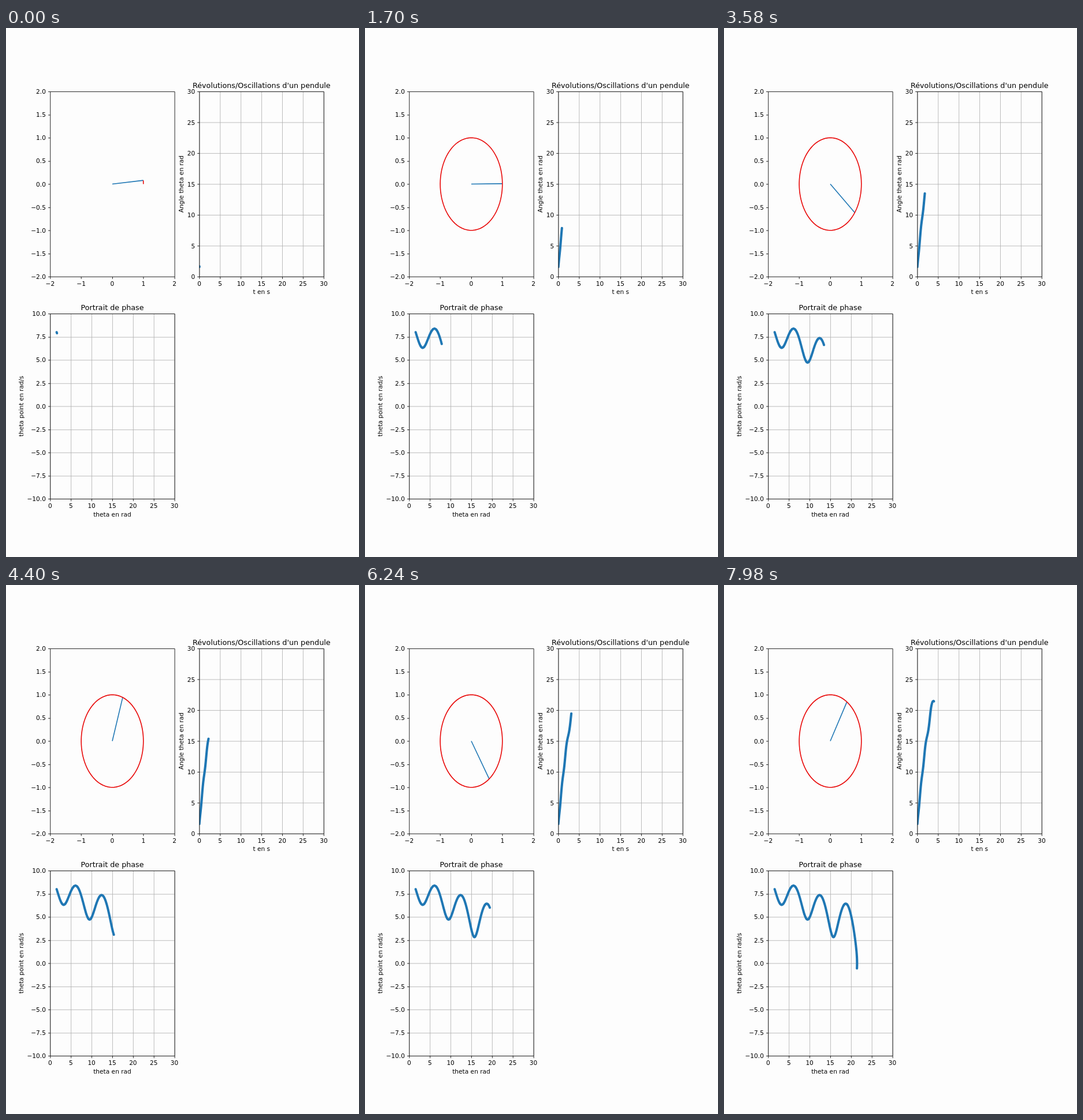
Recreate the animation shown at these times as an HTML page with a canvas. Size 611 px wide and 917 px high, loop 8000 ms.

```html
<!DOCTYPE html>
<html lang="fr">
<head>
<meta charset="utf-8">
<title>Pendule</title>
<style>
  html, body { margin: 0; width: 100%; height: 100%; overflow: hidden; background: #fdfdfd; }
  canvas { display: block; }
</style>
</head>
<body>
<canvas id="stage" width="611" height="917"></canvas>
<script>
const ctx = document.getElementById('stage').getContext('2d');

// The figure is laid out on an 800 x 1200 sheet at 100 dpi.
const W = 800, H = 1200, PT = 100 / 72;
const LOOP = 8000, STEP = 20, FRAMES = LOOP / STEP;
const BLUE = '#1f77b4', RED = '#e80808', GRID = '#b0b0b0';

const range = (from, to, step) =>
  Array.from({ length: Math.round((to - from) / step) + 1 }, (_, i) => from + i * step);
const snap = v => Math.floor(v + 0.5 + 1e-6) + 0.5;
const label = (v, digits) => v.toFixed(digits).replace('-', '\u2212');

// Damped pendulum, integrated with fourth-order Runge-Kutta.
function simulate(count, dt = 0.01, g = 9.81, damping = 0.2) {
  const slope = ([a, w]) => [w, -g * Math.sin(a) - damping * w];
  const move = (s, d, h) => [s[0] + d[0] * h, s[1] + d[1] * h];
  const states = [[Math.PI / 2, 8]];
  for (let i = 1; i < count; i++) {
    const s = states[i - 1];
    const k1 = slope(s);
    const k2 = slope(move(s, k1, dt / 2));
    const k3 = slope(move(s, k2, dt / 2));
    const k4 = slope(move(s, k3, dt));
    states.push(s.map((v, j) => v + dt / 6 * (k1[j] + 2 * k2[j] + 2 * k3[j] + k4[j])));
  }
  return states.map(([angle, speed], i) => ({
    t: i * dt, angle, speed, x: Math.sin(angle), y: -Math.cos(angle)
  }));
}

const states = simulate(FRAMES + 1);

const boxW = 0.775 * W / 2.2, boxH = 0.77 * H / 2.2;

function makeAxes(col, row, xs, ys, options) {
  const left = 0.125 * W + col * 1.2 * boxW;
  const top = 0.12 * H + row * 1.2 * boxH;
  const x0 = xs[0], x1 = xs[xs.length - 1];
  const y0 = ys[0], y1 = ys[ys.length - 1];
  return {
    left, top, right: left + boxW, bottom: top + boxH, xs, ys, ...options,
    px: v => left + (v - x0) / (x1 - x0) * boxW,
    py: v => top + (y1 - v) / (y1 - y0) * boxH
  };
}

const tens = range(0, 30, 5);
const swing = makeAxes(0, 0, range(-2, 2, 1), range(-2, 2, 0.5), { digits: 1 });
const history = makeAxes(1, 0, tens, tens, {
  digits: 0, grid: true, title: "Révolutions/Oscillations d'un pendule",
  xlabel: 't en s', ylabel: 'Angle theta en rad', ylabelX: 402
});
const phase = makeAxes(0, 1, tens, range(-10, 10, 2.5), {
  digits: 1, grid: true, title: 'Portrait de phase',
  xlabel: 'theta en rad', ylabel: 'theta point en rad/s', ylabelX: 38.9
});

function polyline(points, color, width) {
  ctx.beginPath();
  points.forEach(([x, y]) => ctx.lineTo(x, y));
  ctx.strokeStyle = color;
  ctx.lineWidth = width * PT;
  ctx.stroke();
}

function text(str, x, y, size = 10, align = 'center') {
  ctx.font = `${size * PT}px "DejaVu Sans", sans-serif`;
  ctx.textAlign = align;
  ctx.fillText(str, x, y);
}

function drawGrid(ax) {
  if (!ax.grid) return;
  ax.xs.forEach(v => {
    const x = snap(ax.px(v));
    polyline([[x, ax.top], [x, ax.bottom]], GRID, 0.8);
  });
  ax.ys.forEach(v => {
    const y = snap(ax.py(v));
    polyline([[ax.left, y], [ax.right, y]], GRID, 0.8);
  });
}

function drawFrame(ax) {
  const l = snap(ax.left), r = snap(ax.right), t = snap(ax.top), b = snap(ax.bottom);
  const tick = 3.5 * PT;
  ctx.strokeStyle = ctx.fillStyle = '#000';
  ctx.lineWidth = 0.8 * PT;
  ctx.strokeRect(l, t, r - l, b - t);

  ax.xs.forEach(v => {
    const x = snap(ax.px(v));
    polyline([[x, b], [x, b + tick]], '#000', 0.8);
    text(label(v, 0), ax.px(v), ax.bottom + 20.3);
  });
  ax.ys.forEach(v => {
    const y = snap(ax.py(v));
    polyline([[l - tick, y], [l, y]], '#000', 0.8);
    text(label(v, ax.digits), ax.left - 2 * tick, ax.py(v) + 5.3, 10, 'right');
  });

  const midX = (ax.left + ax.right) / 2, midY = (ax.top + ax.bottom) / 2;
  if (ax.title) text(ax.title, midX, ax.top - 6 * PT, 12);
  if (ax.xlabel) text(ax.xlabel, midX, ax.bottom + 39.8);
  if (ax.ylabel) {
    ctx.save();
    ctx.translate(ax.ylabelX, midY);
    ctx.rotate(-Math.PI / 2);
    text(ax.ylabel, 0, 0);
    ctx.restore();
  }
}

function drawDots(ax, shown, xKey, yKey) {
  ctx.fillStyle = BLUE;
  ctx.beginPath();
  shown.forEach(s => {
    const x = ax.px(s[xKey]), y = ax.py(s[yKey]);
    ctx.moveTo(x + 2 * PT, y);
    ctx.arc(x, y, 2 * PT, 0, 2 * Math.PI);
  });
  ctx.fill();
}

function drawPendulum(ax, shown) {
  const at = s => [ax.px(s.x), ax.py(s.y)];
  polyline([at({ x: 0, y: 0 }), at(shown[shown.length - 1])], BLUE, 1.5);
  polyline(shown.map(at), RED, 1.5);
}

function drawAxes(ax, drawData) {
  drawGrid(ax);
  ctx.save();
  ctx.beginPath();
  ctx.rect(ax.left, ax.top, boxW, boxH);
  ctx.clip();
  drawData();
  ctx.restore();
  drawFrame(ax);
}

function draw(ms) {
  const shown = states.slice(0, Math.floor(ms / STEP) + 2);
  ctx.setTransform(611 / W, 0, 0, 917 / H, 0, 0);
  ctx.lineJoin = 'round';
  ctx.fillStyle = '#fdfdfd';
  ctx.fillRect(0, 0, W, H);
  drawAxes(swing, () => drawPendulum(swing, shown));
  drawAxes(history, () => drawDots(history, shown, 't', 'angle'));
  drawAxes(phase, () => drawDots(phase, shown, 'angle', 'speed'));
}

const start = performance.now();
function loop() {
  draw((performance.now() - start) % LOOP);
  requestAnimationFrame(loop);
}
loop();
</script>
</body>
</html>
```
